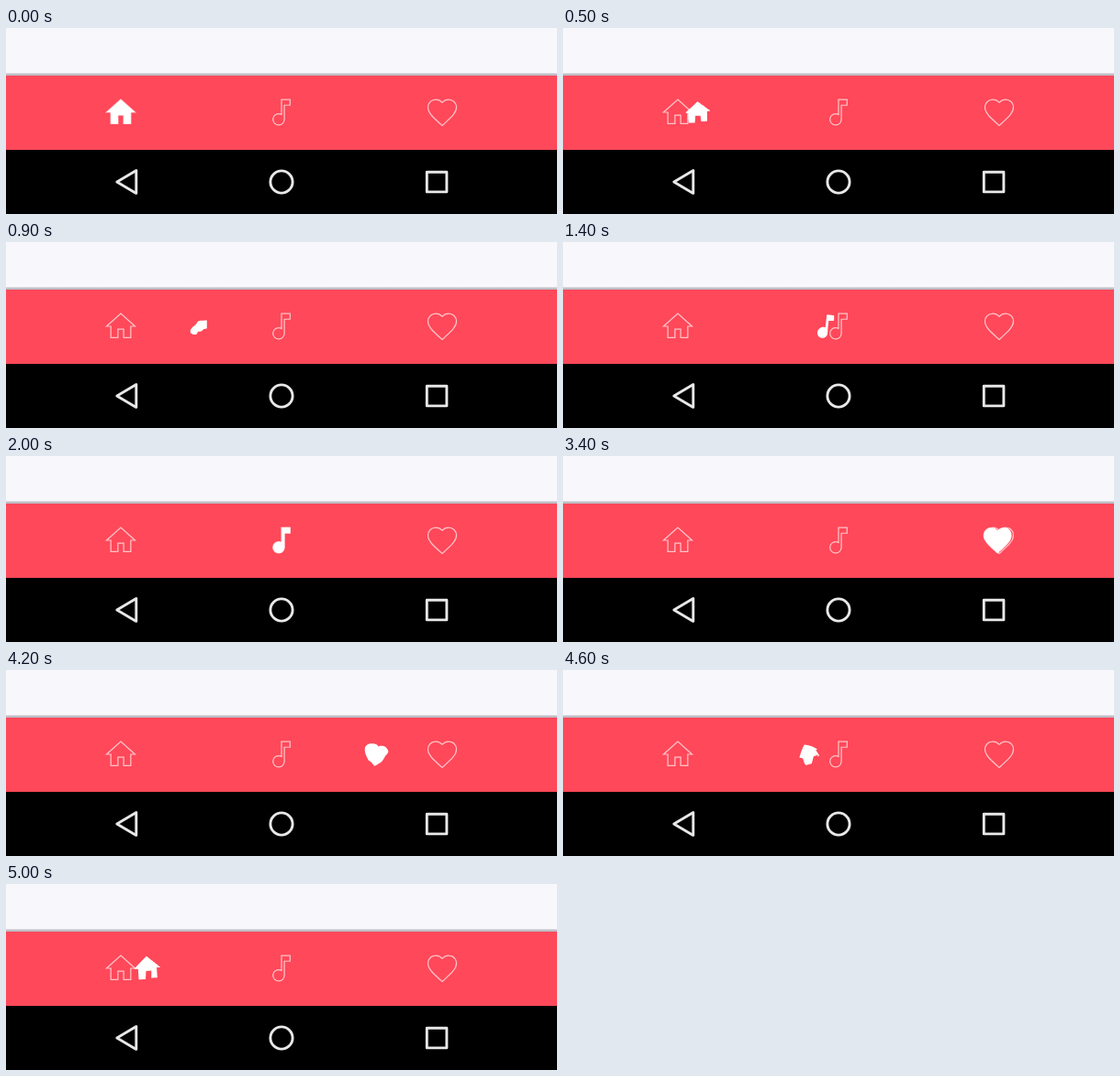
An HTML page that plays this animation: 600x203 px, repeating every 5100 ms.

```html
<!DOCTYPE html>
<html lang="en">
<head>
<meta charset="utf-8">
<title>Morphing tab bar</title>
<style>
  html, body { margin: 0; width: 100%; height: 100%; overflow: hidden; background: #000; }
  svg { display: block; width: 100vw; height: 100vh; }
</style>
</head>
<body>
<svg viewBox="0 0 600 203">
  <defs>
    <linearGradient id="edge" x2="0" y2="1">
      <stop offset="0" stop-color="#f8f8fc"/>
      <stop offset=".45" stop-color="#c3c1ca"/>
      <stop offset="1" stop-color="#b5b0ba"/>
    </linearGradient>
  </defs>
  <rect width="600" height="49" fill="#f8f8fc"/>
  <rect y="48.5" width="600" height="4" fill="url(#edge)"/>
  <rect y="52" width="600" height="81" fill="#ff4859"/>
  <rect y="133" width="600" height="70" fill="#000"/>
  <g fill="none" stroke="#e8e8e8" stroke-width="2.9" stroke-linejoin="round">
    <path d="M120.8 168L141.8 155.6V180.4Z"/>
    <circle cx="300" cy="168" r="12.1"/>
    <rect x="458.3" y="157.3" width="21.6" height="21.6"/>
  </g>
  <g id="tabs" fill="none" stroke="#fff" stroke-opacity=".68" stroke-width=".8"></g>
  <path id="blob" fill="#fff"/>
</svg>
<script>
const NS = 'http://www.w3.org/2000/svg';
const LOOP = 5100, STEP = 100, COUNT = 240;

// Icons on a 24-unit grid, all wound counter-clockwise
const HOME = 'M12 3L2 12H5V20H10V14H14V20H19V12H22Z';
const NOTE = 'M12 3V13.55C11.41 13.21 10.73 13 10 13C7.79 13 6 14.79 6 17S7.79 21 10 21S14 19.21 14 17V7H18V3Z';
const HEART = 'M12 5.09C10.91 3.81 9.24 3 7.5 3C4.42 3 2 5.42 2 8.5C2 12.28 5.4 15.36 10.55 20.03L12 21.35L13.45 20.04' +
  'C18.6 15.36 22 12.28 22 8.5C22 5.42 19.58 3 16.5 3C14.76 3 13.09 3.81 12 5.09Z';

// In-between poses
const COMMA = 'M17.8 7.8L13 8L11.5 8.5L10 10.8L8 12.3L6.2 14.5V16.5L8 17.8L10.5 17.7L11.5 15.8L14 15.5L15.5 14L17.8 13.5Z';
const TOOTH = 'M13.1 4.6Q11.8 5.4 11.2 7.2Q9.3 7 7.3 7.8Q5.2 8.8 5.4 10.8Q5.7 13.2 7.3 15.9L8.8 19.3Q9.4 20.5 11.5 20.4' +
  'Q12.8 19.8 13.1 19L14.4 16.2Q15.2 14.6 17.6 12.6Q19.3 10.8 19.2 8.8Q19.9 6.8 18.9 4.6Q17.8 3.2 15.7 3.6Z';

const place = x => `translate(${x} 92) scale(1.55) translate(-12 -12)`;

function addPath(parent, d, x) {
  const el = document.createElementNS(NS, 'path');
  el.setAttribute('d', d);
  el.setAttribute('transform', place(x));
  parent.append(el);
}

// Even points along a path, beginning at the one nearest to (x, y)
function sample(d, x, y) {
  const el = document.createElementNS(NS, 'path');
  el.setAttribute('d', d);
  const len = el.getTotalLength();
  const pts = Array.from({ length: COUNT }, (_, i) => el.getPointAtLength(len * i / COUNT));
  const dist = p => Math.hypot(p.x - x, p.y - y);
  const first = pts.reduce((best, p, i) => dist(p) < dist(pts[best]) ? i : best, 0);
  return pts.slice(first).concat(pts.slice(0, first));
}

const X = { home: 125, note: 300, heart: 475 };
const moves = [
  { start: 150, time: 1530, from: X.home, to: X.note,
    poses: [[0, sample(HOME, 22, 12)], [.485, sample(COMMA, 17.8, 7.8)], [1, sample(NOTE, 12, 3)]] },
  { start: 1970, time: 1530, from: X.note, to: X.heart,
    poses: [[0, sample(NOTE, 12, 3)], [.567, sample(TOOTH, 13.1, 4.6)], [1, sample(HEART, 12, 5.09)]] },
  { start: 3735, time: 1555, from: X.heart, to: X.home,
    poses: [[0, sample(HEART, 2, 8.5)], [1, sample(HOME, 12, 3)]] }
];

const mix = (a, b, k) => a + (b - a) * k;
const ease = k => (1 - Math.cos(Math.PI * k)) / 2;

function morph(poses, p) {
  const i = Math.max(1, poses.findIndex(pose => p <= pose[0]));
  const [p0, a] = poses[i - 1], [p1, b] = poses[i];
  const k = (p - p0) / (p1 - p0);
  return 'M' + a.map((q, j) =>
    mix(q.x, b[j].x, k).toFixed(2) + ' ' + mix(q.y, b[j].y, k).toFixed(2)).join('L') + 'Z';
}

const tabs = document.getElementById('tabs');
const blob = document.getElementById('blob');
addPath(tabs, HOME, X.home);
addPath(tabs, NOTE, X.note);
addPath(tabs, HEART, X.heart);

function draw(t) {
  const move = moves.filter(m => m.start <= t).pop() || moves[0];
  const p = ease(Math.min(1, Math.max(0, (t - move.start) / move.time)));
  blob.setAttribute('d', morph(move.poses, p));
  blob.setAttribute('transform', place(mix(move.from, move.to, p)));
}

const origin = performance.now();
function tick() {
  const t = (performance.now() - origin) % LOOP;
  draw(Math.floor(t / STEP) * STEP);
  requestAnimationFrame(tick);
}
tick();
</script>
</body>
</html>
```
